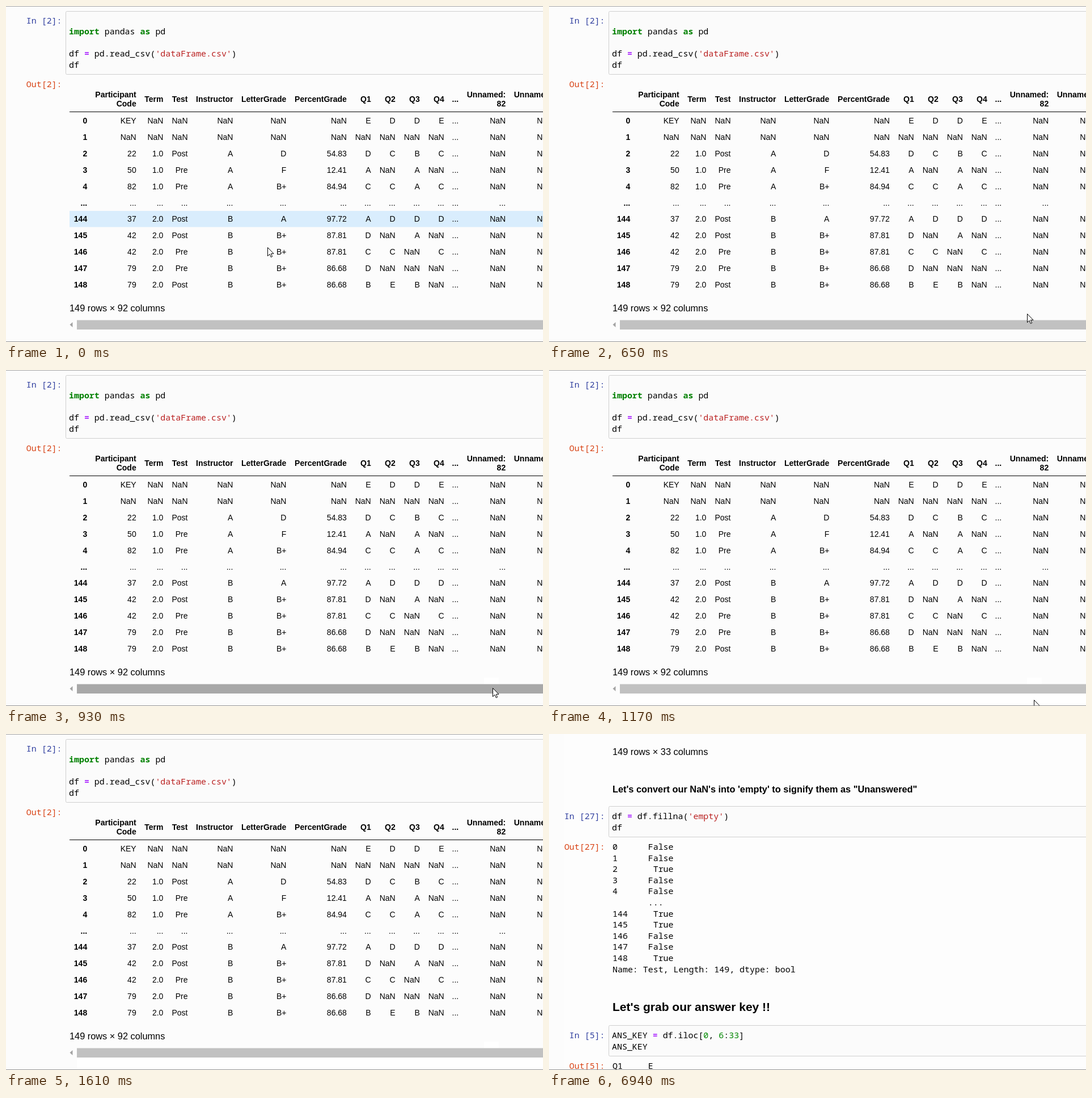
These frames come from a looping animation (947 by 592 pixels, 8000 ms). An HTML page:

```html
<!DOCTYPE html>
<html lang="en">
<head>
<meta charset="utf-8">
<title>Notebook scroll</title>
<style>
  html, body { margin: 0; width: 100%; height: 100%; overflow: hidden; background: #fcfcfc; }
  svg { display: block; width: 947px; height: 592px; }
  text { white-space: pre; fill: #000; }
  .cell { font: 14px "Liberation Sans", Arial, sans-serif; }
  .body { font: 16.33px "Liberation Sans", Arial, sans-serif; }
  .h3 { font: bold 21px "Liberation Sans", Arial, sans-serif; }
  .mono { font: 14.95px "Noto Sans Mono", monospace; }
  .b { font-weight: bold; }
  .end { text-anchor: end; }
  .in { fill: #303f9f; }
  .out { fill: #d84315; }
  .kw { fill: #008000; font-weight: bold; }
  .op { fill: #aa22ff; font-weight: bold; }
  .str { fill: #ba2121; }
  .num { fill: #008800; }
</style>
</head>
<body>
<svg id="stage" viewBox="0 0 947 592"></svg>
<script>
const NS = 'http://www.w3.org/2000/svg';
const stage = document.getElementById('stage');

function add(parent, tag, attrs, content) {
  const el = document.createElementNS(NS, tag);
  for (const k in attrs) el.setAttribute(k, attrs[k]);
  if (content !== undefined) el.textContent = content;
  return parent.appendChild(el);
}
const group = (parent = stage) => add(parent, 'g', {});
const rect = (g, x, y, width, height, fill) => add(g, 'rect', { x, y, width, height, fill });
const label = (g, x, y, cls, str) => add(g, 'text', { x, y, class: cls }, str);
const show = (el, on) => el.setAttribute('visibility', on ? 'inherit' : 'hidden');

// parts: plain strings or [class, string] pairs
function code(g, y, ...parts) {
  const t = add(g, 'text', { x: 111, y, class: 'mono' });
  for (const p of parts) {
    if (Array.isArray(p)) add(t, 'tspan', { class: p[0] }, p[1]);
    else add(t, 'tspan', {}, p);
  }
}

function prompt(g, y, kind, n) {
  const str = (kind === 'in' ? 'In [' : 'Out[') + n + ']:';
  label(g, 98.6, y, 'mono end ' + kind, str);
}

function inputBox(g, y, h) {
  add(g, 'rect', { x: 105.5, y: y + .5, width: 860, height: h, rx: 2, fill: '#fbfbfb', stroke: '#cfcfcf' });
}

function scrollbar(g, y) {
  add(g, 'path', { d: `M112.5 ${y + 8} l5 -4.5 v9 z`, fill: '#a3a3a3' });
  return rect(g, 125, y, 822, 16.5, '#c1c1c1');
}

const index = '0 1 2 3 4 ... 144 145 146 147 148'.split(' ');
const heads = 'Participant|Code,Term,Test,Instructor,LetterGrade,PercentGrade,Q1,Q2,Q3,Q4,...'.split(',');
const edges = [229.7, 277.4, 320.5, 400.4, 494.4, 600.9, 643.7, 686.7, 729.8, 772.7, 798.2];
const grades = `KEY - - - - - E D D E
- - - - - - - - - -
22 1.0 Post A D 54.83 D C B C
50 1.0 Pre A F 12.41 A - A -
82 1.0 Pre A B+ 84.94 C C A C
... ... ... ... ... ... ... ... ... ...
37 2.0 Post B A 97.72 A D D D
42 2.0 Post B B+ 87.81 D - A -
42 2.0 Pre B B+ 87.81 C C - C
79 2.0 Pre B B+ 86.68 D - - -
79 2.0 Post B B+ 86.68 B E B -`.split('\n').map(r => r.split(' ').concat('...'));

// extra columns: [heading, right edge, eleven values]
function table(g, dx, dy, extra) {
  const cols = heads.map((h, i) => [h, edges[i] + dx, grades.map(r => r[i])]).concat(extra);
  rect(g, 112, 186 + Math.round(dy), 835, 1, '#000');
  const rowY = i => 207 + dy + i * 28.9;
  index.forEach((s, i) => label(g, 143.2, rowY(i), 'cell b end', s));
  for (const [head, x, values] of cols) {
    const lines = head.split('|');
    lines.forEach((s, i) => label(g, x, 169 + dy + (i - (lines.length - 1) / 2) * 16, 'cell b end', s));
    values.forEach((v, i) => label(g, x, rowY(i), 'cell end', v === '-' ? 'NaN' : v));
  }
}

const nans = '- - - - - ... - - - - -'.split(' ');

// Scene 1: loading the data
const load = group();
rect(load, 0, 0, 947, 592, '#fcfcfc');
rect(load, 0, 0, 947, 1, '#a4a4a4');
const hover = rect(load, 112, 361, 835, 28.5, '#d9edfd');
const trail = group(load);
rect(trail, 461, 425, 62, 22, '#f4f4f4');
rect(trail, 461, 447, 62, 23, '#fff');
const patch = rect(load, 843, 542, 26, 11, '#fff');
const strip = rect(load, 125, 570, 822, 21, '#fff');
inputBox(load, 9, 111);
prompt(load, 31, 'in', 2);
code(load, 50, ['kw', 'import'], ' pandas ', ['kw', 'as'], ' pd');
code(load, 89, 'df ', ['op', '='], ' pd.read_csv(', ['str', "'dataFrame.csv'"], ')');
code(load, 109, 'df');
prompt(load, 142.5, 'out', 2);
table(load, 0, 0, [['Unnamed:|82', 881.2, nans], ['Unnamed:|83', 964.2, nans]]);
label(load, 112, 538, 'body', '149 rows × 92 columns');
const thumb = scrollbar(load, 553.5);

// Scene 2: trimming columns
const trim = group();
rect(trim, 0, 0, 947, 592, '#fcfcfc');
rect(trim, 125, 570, 822, 21, '#fff');
scrollbar(trim, -8);
label(trim, 112, 61.5, 'body b', "Let's get rid of the extra columns");
inputBox(trim, 86, 54);
prompt(trim, 109, 'in', 3);
code(trim, 109, 'df ', ['op', '='], 'df.iloc[:, ', ['num', '0'], ':', ['num', '33'], ']');
code(trim, 128.5, 'df');
prompt(trim, 162, 'out', 3);
table(trim, 23.2, 19.6, [
  ['Q18', 864.2, 'B - C - D ... - - - - -'.split(' ')],
  ['Q19', 907.3, 'C - A A - ... - E - - -'.split(' ')],
  ['Q20', 950.4, 'E - C E E ... - C - - -'.split(' ')]
]);
label(trim, 112, 557.5, 'body', '149 rows × 33 columns');

// Scene 3: filling gaps
const fill = group();
rect(fill, 0, 0, 947, 592, '#fcfcfc');
rect(fill, 27, 0, 920, 591, '#fdfdfd');
label(fill, 112, 37, 'body', '149 rows × 33 columns');
label(fill, 112, 102.5, 'body b', `Let's convert our NaN's into 'empty' to signify them as "Unanswered"`);
inputBox(fill, 127, 54);
prompt(fill, 150, 'in', 27);
code(fill, 150, 'df ', ['op', '='], ' df.fillna(', ['str', "'empty'"], ')');
code(fill, 169.5, 'df');
prompt(fill, 203.5, 'out', 27);
[0, 0, 1, 0, 0, null, 1, 1, 0, 0, 1].forEach((v, i) => {
  const str = v === null ? ' '.repeat(7) + '...' : index[i].padEnd(7) + (v ? ' True' : 'False');
  label(fill, 112, 204 + i * 19.6, 'mono', str);
});
label(fill, 112, 419.5, 'mono', 'Name: Test, Length: 149, dtype: bool');
label(fill, 112, 487.5, 'h3', "Let's grab our answer key !!");
inputBox(fill, 513, 54);
prompt(fill, 536, 'in', 5);
code(fill, 536, 'ANS_KEY ', ['op', '='], ' df.iloc[', ['num', '0'], ', ', ['num', '6'], ':', ['num', '33'], ']');
code(fill, 555.5, 'ANS_KEY');
prompt(fill, 589.5, 'out', 5);
label(fill, 112, 590, 'mono', 'Q1     E');

const cursor = add(stage, 'path', {
  d: 'M.5 .5 V15.5 L4 12.2 L6.3 17.5 L8.6 16.5 L6.4 11.3 H11 Z',
  fill: '#fff', stroke: '#000', 'stroke-width': 1
});
rect(stage, 0, 591, 947, 1, '#949494');

// [start ms, x, y] of the pointer tip
const path = [[0, 461, 425], [510, 512, 452], [650, 843, 542], [930, 858, 560],
  [1050, 863, 575], [1170, 855, 581], [1300, 840, 585], [1440, 840, 591], [1610, 840, 600]];
const LOOP = 8000;
let start;

function draw(now) {
  if (start === undefined) start = now;
  const t = Math.max(0, now - start) % LOOP;
  show(load, t < 4510);
  show(trim, t >= 4510 && t < 6940);
  show(fill, t >= 6940);
  show(hover, t < 650 );
  show(trail, t >= 510 && t < 650);
  if (t >= 4510) { show(hover, false); show(trail, false); }
  const [, x, y] = path.filter(p => p[0] <= t).pop();
  cursor.setAttribute('transform', `translate(${x} ${y})`);
  show(cursor, t < 1610);
  patch.setAttribute('fill', t >= 930 ? '#fff' : '#fcfcfc');
  strip.setAttribute('fill', t >= 1050 ? '#fff' : '#fcfcfc');
  thumb.setAttribute('fill', t >= 930 && t < 1170 ? '#a8a8a8' : '#c1c1c1');
  requestAnimationFrame(draw);
}
draw(performance.now());
</script>
</body>
</html>
```
